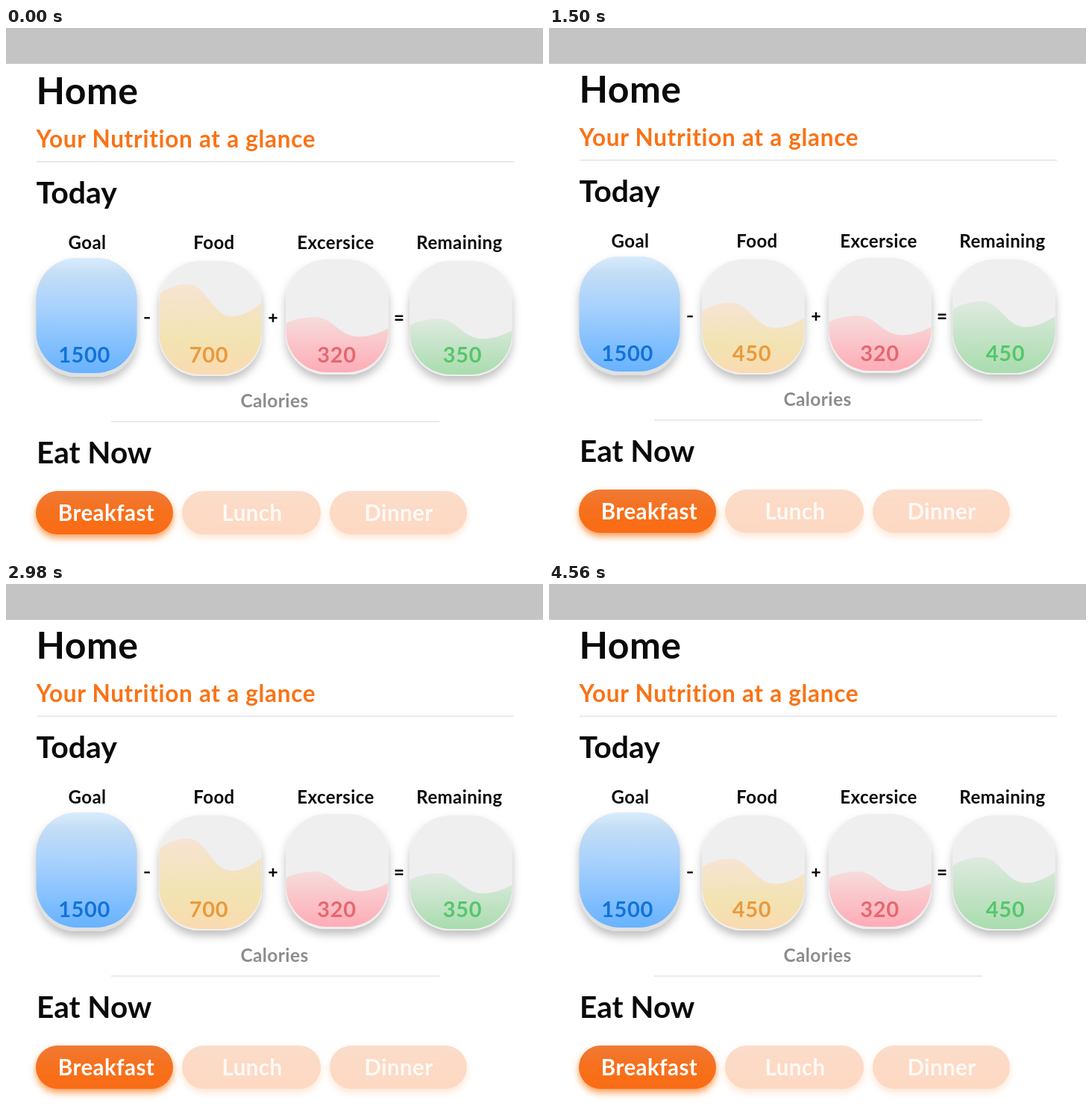
An HTML page that plays this animation: 720x707 px, repeating every 4.58 s.

```html
<!DOCTYPE html>
<html lang="en">
<head>
<meta charset="utf-8">
<title>Nutrition</title>
<style>
html, body { margin: 0; width: 100%; height: 100%; overflow: hidden; background: #fff; }
svg { display: block; width: 100vw; height: 100vh; }
text { font-family: Lato, Inter, sans-serif; font-weight: 700; fill: #0a0a0a; }
.mid { text-anchor: middle; }
.num { font-size: 29px; letter-spacing: .6px; }
.label { font-size: 24px; letter-spacing: .4px; }
.op { font: 600 23px Inter, sans-serif; }
.meal { font-size: 29.5px; letter-spacing: .4px; fill: #fff; }
</style>
</head>
<body>
<svg viewBox="0 0 720 707" preserveAspectRatio="none">
  <defs>
    <filter id="soft" x="-20%" y="-20%" width="140%" height="150%">
      <feDropShadow dx="0" dy="7" stdDeviation="6" flood-color="#000" flood-opacity=".25"/>
    </filter>
    <filter id="glow" x="-20%" y="-30%" width="140%" height="190%">
      <feDropShadow dx="0" dy="5" stdDeviation="5" flood-color="#f97316" flood-opacity=".7"/>
    </filter>
    <linearGradient id="orange" x2="0" y2="1">
      <stop stop-color="#f07a35"/><stop offset=".45" stop-color="#f6701f"/><stop offset="1" stop-color="#fa6c12"/>
    </linearGradient>
    <linearGradient id="blue" x2="0" y2="1">
      <stop stop-color="#d8ecfd"/><stop offset=".14" stop-color="#c3ddf6"/>
      <stop offset=".4" stop-color="#a9d2fd"/><stop offset="1" stop-color="#63b0ff"/>
    </linearGradient>
    <linearGradient id="yellow" x2="0" y2="1">
      <stop stop-color="#f7e4d4"/><stop offset=".6" stop-color="#f2e3b1"/><stop offset="1" stop-color="#fbdab2"/>
    </linearGradient>
    <linearGradient id="pink" x2="0" y2="1">
      <stop stop-color="#f6dcdc"/><stop offset="1" stop-color="#ffabb6"/>
    </linearGradient>
    <linearGradient id="green" x2="0" y2="1">
      <stop stop-color="#dfeae0"/><stop offset="1" stop-color="#a7dcac"/>
    </linearGradient>
  </defs>
  <rect width="720" height="707" fill="#fff"/>
  <g id="page">
    <text x="40.5" y="102" font-size="50" letter-spacing=".5">Home</text>
    <text x="40.5" y="160" font-size="31.5" letter-spacing=".7" style="fill:#f97316">Your Nutrition at a glance</text>
    <path d="M41 179H681M141 527H581" stroke="#eaeaea" stroke-width="2"/>
    <text x="40.5" y="235" font-size="41">Today</text>
    <g id="cards"></g>
    <text class="mid" x="360" y="508" font-size="24.5" letter-spacing=".4" style="fill:#8c8c8c">Calories</text>
    <text x="41" y="583" font-size="40.5">Eat Now</text>
    <g id="meals"></g>
  </g>
  <rect width="720" height="48" fill="#c4c4c4"/>
</svg>
<script>
const LOOP = 4580, TURN = 500;
const $ = id => document.getElementById(id);

function add(parent, tag, attrs, text) {
  const el = document.createElementNS("http://www.w3.org/2000/svg", tag);
  for (const k in attrs) el.setAttribute(k, attrs[k]);
  if (text) el.textContent = text;
  parent.appendChild(el);
  return el;
}

function card(x, y, w, h, inset, paint, base = "#efefef") {
  const g = $("cards"), id = "clip-" + paint;
  add(g, "rect", { x, y, width: w, height: h, rx: 55, fill: base, filter: "url(#soft)" });
  const clip = add(g, "clipPath", { id });
  add(clip, "rect", { x: x + .5, y, width: w - 1, height: h - inset, rx: 55 });
  return add(g, "path", { fill: `url(#${paint})`, "clip-path": `url(#${id})` });
}

const label = (x, s) => add($("cards"), "text", { class: "mid label", x, y: 296 }, s);
const op = (x, s) => add($("cards"), "text", { class: "mid op", x, y: 394.5 }, s);
const num = (x, s, color) =>
  add($("cards"), "text", { class: "mid num", x, y: 448, style: "fill:" + color }, s);

// Wave height scales with the amount of fill.
function wave(x, w, top, bottom) {
  const h = bottom - top, X = f => x + w * f, Y = f => top + h * f;
  return `M${x} ${Y(.115)}C${X(.07)} ${Y(.05)} ${X(.17)} ${top} ${X(.28)} ${top}` +
    `C${X(.46)} ${top} ${X(.52)} ${Y(.35)} ${X(.71)} ${Y(.35)}` +
    `C${X(.82)} ${Y(.35)} ${X(.92)} ${Y(.28)} ${X(1)} ${Y(.2)}V${bottom}H${x}Z`;
}

label(109, "Goal");
label(279, "Food");
label(442, "Excersice");
label(608, "Remaining");

card(40, 308, 136, 159, 5, "blue", "#e0e0e0").setAttribute("d", "M40 308h136v160h-136z");
const food = card(205, 312, 138, 154, 2, "yellow");
card(375, 310, 138, 154, 3, "pink").setAttribute("d", wave(375, 138, 387, 462));
const rest = card(541, 312, 138, 154, 2, "green");

op(189, "-");
op(358, "+");
op(527, "=");

num(105, "1500", "#1273d8");
num(443.5, "320", "#e4686d");
const high = [num(272, "700", "#eb993c"), num(612, "350", "#55c76a")];
const low = [num(272, "450", "#eb993c"), num(612, "450", "#55c76a")];

[["Breakfast", 40, 184, 134.5], ["Lunch", 236, 186, 330], ["Dinner", 434, 184, 526.5]].forEach(([s, x, width, mid], i) => {
  const g = add($("meals"), "g", i ? { opacity: .25 } : {});
  add(g, "rect", { x, y: 620, width, height: 58, rx: 29, fill: "url(#orange)", filter: "url(#glow)" });
  add($("meals"), "text", { class: "mid meal", x: mid, y: 660, opacity: i ? .85 : 1 }, s);
});

const clamp = v => Math.min(1, Math.max(0, v));
const mix = (a, b, p) => a + (b - a) * p;
const ease = (t, start) => {
  const u = clamp((t - start) / TURN);
  return u * u * (3 - 2 * u);
};

function draw(t) {
  const p = ease(t, 340) - ease(t, 1600) + ease(t, 3210);
  food.setAttribute("d", wave(205, 138, mix(343, 370, p), 466));
  rest.setAttribute("d", wave(541, 138, mix(389.5, 368, p), 466));
  const fade = clamp((p - .1) / .8);
  high.forEach(el => el.setAttribute("opacity", 1 - fade));
  low.forEach(el => el.setAttribute("opacity", fade));
  const lift = -2 * clamp((t - 960) / 60);
  $("page").setAttribute("transform", `translate(0 ${lift})`);
}

const begin = performance.now();
function tick() {
  draw((performance.now() - begin) % LOOP);
  requestAnimationFrame(tick);
}
draw(0);
requestAnimationFrame(tick);
</script>
</body>
</html>
```
